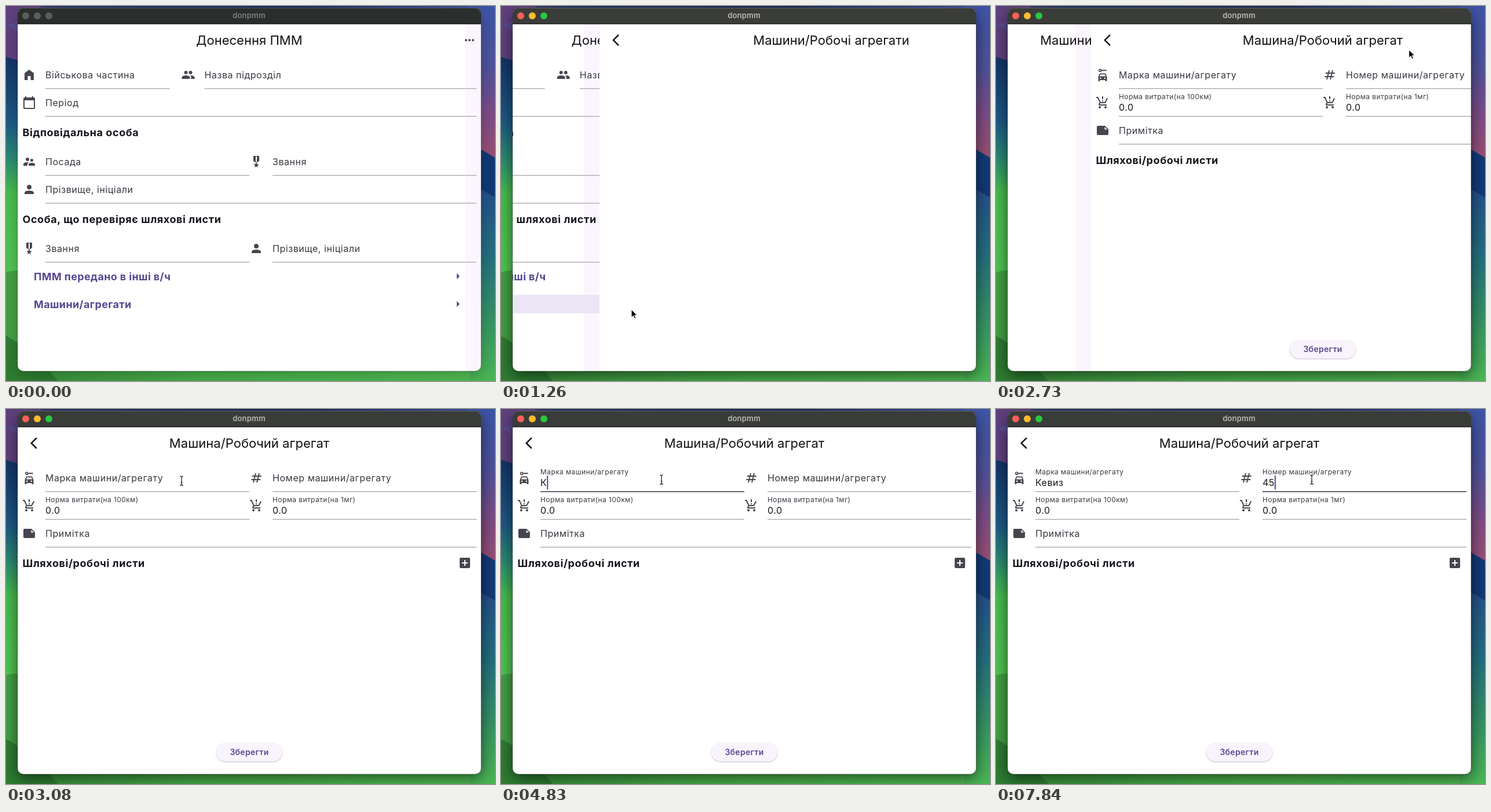
These frames come from a looping animation (844 px wide and 648 px high, 8 s). An HTML page:

```html
<!DOCTYPE html>
<html lang="uk">
<head>
<meta charset="utf-8">
<title>donpmm</title>
<style>
  html, body { margin: 0; width: 100%; height: 100%; overflow: hidden; background: #2f7d32; }
  svg { display: block; width: 100vw; height: 100vh; font-family: Inter, "Open Sans", sans-serif; }
  text { white-space: pre; }
  .title { font-size: 22px; letter-spacing: .04px; fill: #120f14; text-anchor: middle; }
  .label { font-size: 16px; letter-spacing: .54px; fill: #3b3740; }
  .value { font-size: 16px; letter-spacing: .5px; fill: #17141a; }
  .head { font-size: 18px; font-weight: 700; letter-spacing: .58px; fill: #17131b; }
  .head.link { letter-spacing: .38px; fill: #57478f; }
  .icon { fill: #49454f; fill-rule: evenodd; }
  #edge { mix-blend-mode: darken; }
</style>
</head>
<body>
<svg id="stage" viewBox="0 0 844 648" preserveAspectRatio="none">
  <defs>
    <linearGradient id="leftBg" gradientUnits="userSpaceOnUse" x1="0" y1="88" x2="0" y2="648">
      <stop offset="0" stop-color="#123468"/><stop offset=".2" stop-color="#1e5a86"/>
      <stop offset=".31" stop-color="#2b8a74"/><stop offset=".42" stop-color="#48bd4e"/>
      <stop offset=".66" stop-color="#52c552"/><stop offset="1" stop-color="#3fa342"/>
    </linearGradient>
    <linearGradient id="rightTop" gradientUnits="userSpaceOnUse" x1="0" y1="0" x2="0" y2="262">
      <stop offset="0" stop-color="#3d55a6"/><stop offset=".4" stop-color="#4f529c"/>
      <stop offset=".7" stop-color="#7b4d88"/><stop offset="1" stop-color="#9a4f74"/>
    </linearGradient>
    <linearGradient id="rightLow" gradientUnits="userSpaceOnUse" x1="0" y1="318" x2="0" y2="648">
      <stop offset="0" stop-color="#24508a"/><stop offset=".35" stop-color="#24707f"/>
      <stop offset=".65" stop-color="#349067"/><stop offset="1" stop-color="#4bb654"/>
    </linearGradient>
    <linearGradient id="topBg"><stop offset="0" stop-color="#5a3f80"/><stop offset=".12" stop-color="#243667"/>
      <stop offset=".6" stop-color="#1c2c5c"/><stop offset="1" stop-color="#3d55a6"/></linearGradient>
    <linearGradient id="bottomBg"><stop offset="0" stop-color="#398d3b"/><stop offset=".4" stop-color="#48b04a"/>
      <stop offset="1" stop-color="#52c056"/></linearGradient>
    <filter id="blurWide" x="-20%" y="-20%" width="140%" height="140%"><feGaussianBlur stdDeviation="13"/></filter>
    <filter id="blurSoft" x="-20%" y="-50%" width="140%" height="200%"><feGaussianBlur stdDeviation="1.3"/></filter>
    <clipPath id="body"><path d="M20 31H820V621a10 10 0 0 1-10 10H30a10 10 0 0 1-10-10z"/></clipPath>
  </defs>

  <g id="wallpaper">
    <rect width="844" height="648" fill="url(#bottomBg)"/>
    <rect width="844" height="12" fill="url(#topBg)"/>
    <rect width="30" height="620" fill="url(#leftBg)"/>
    <path d="M0 0H60V106L0 88z" fill="#60417f"/>
    <path d="M0 34L40 20V60L0 30z" fill="#5a4f93"/>
    <path d="M0 460Q15 455 30 458V620L0 648z" fill="#43a044"/>
    <path d="M0 570Q40 590 90 648H0z" fill="#2e7d32"/>
    <rect x="800" width="44" height="330" fill="url(#rightTop)"/>
    <path d="M800 306L844 331V648H800z" fill="url(#rightLow)"/>
    <path d="M800 236L844 262V331L800 306z" fill="#123a77"/>
  </g>
  <rect id="shade" x="20" y="14" width="800" height="624" rx="10" filter="url(#blurWide)"/>

  <path id="bar" d="M20 32V13a10 10 0 0 1 10-10H810a10 10 0 0 1 10 10V32z"/>
  <path d="M21 11a9.500 9.500 0 0 1 9-7.500H810a9.500 9.500 0 0 1 9 7.500" fill="none" stroke="#fff" stroke-opacity=".22"/>
  <g id="lights"><circle cx="34" cy="17" r="6"/><circle cx="54" cy="17" r="6"/><circle cx="74" cy="17" r="6"/></g>
  <text id="appName" x="419.500" y="21" text-anchor="middle" font-size="13" font-weight="600" letter-spacing=".2">donpmm</text>
  <g id="pages" clip-path="url(#body)"></g>
  <rect x="20" y="30.200" width="800" height="1.300" fill="#111"/>
  <path d="M20 31V621a10 10 0 0 0 10 10H810a10 10 0 0 0 10-10V31" fill="none" stroke="#000" stroke-opacity=".3"/>

  <g id="arrow"><path d="M0 0V14.500L3.400 11.400 5.600 16.300 8 15.200 5.900 10.500H10.300z" fill="#000" stroke="#fff" stroke-width="1.100"/></g>
  <g id="hand"><path d="M3.500 11L.6 7.700Q-.6 5.900 1 5.700 2.300 5.900 3.500 7.300L2.800 1.600Q2.900.2 4 .2 5 .3 5.200 1.600L5.700 5.200Q7 4.300 7.800 5.500 9.200 4.800 9.900 6.100 11.500 5.600 11.800 7.300 12.200 11 10.600 13.300V16H4.900V14z" fill="#fff" stroke="#111" stroke-width="1.100"/><path d="M6.200 9.500V13M8 9.500V13M9.800 9.500V13" stroke="#111" stroke-width=".9"/></g>
  <g id="beam" fill="none"><path d="M-3-8Q0-8 0-6 0-8 3-8M0-6V6M-3 8Q0 8 0 6 0 8 3 8M-1.500 3H1.500" stroke="#fff" stroke-width="2.600"/><path d="M-3-8Q0-8 0-6 0-8 3-8M0-6V6M-3 8Q0 8 0 6 0 8 3 8M-1.500 3H1.500" stroke="#111" stroke-width="1.200"/></g>
</svg>

<script>
const LOOP = 8000;
const $ = id => document.getElementById(id);

function el(parent, tag, attrs = {}, text) {
  const node = document.createElementNS('http://www.w3.org/2000/svg', tag);
  for (const key in attrs) node.setAttribute(key, attrs[key]);
  if (text !== undefined) node.textContent = text;
  parent.appendChild(node);
  return node;
}
const set = (node, key, value) => node.setAttribute(key, value);
const show = (node, opacity) => set(node, 'opacity', +opacity);

// 24 x 24 icons
const body = (x, y, w, h) => `M${x} ${y}q-${w} 0-${w} ${h}v2h${2 * w}v-2q0-${h}-${w}-${h}z`;
const disc = (x, y, r) => `M${x - r} ${y}a${r} ${r} 0 1 0 ${2 * r} 0a${r} ${r} 0 1 0-${2 * r} 0z`;
const ICONS = {
  home: 'M12 3L4 9v12h5.500v-7h5v7H20V9z',
  group: disc(8, 8, 3) + disc(16, 8, 3) + body(8, 13, 7, 4) + 'M15 13.050Q17 14.300 17 16.500V19h6v-2.500Q22.500 13 15 13.050z',
  calendar: 'M20 3h-1V1h-2v2H7V1H5v2H4q-2 0-2 2v16q0 2 2 2h16q2 0 2-2V5q0-2-2-2zM20 21H4V8h16z',
  staff: disc(9, 8, 3) + disc(16.5, 9.5, 2.5) + body(16.5, 14, 5.5, 3) + 'M9 13Q2 13 2 16.500V19h7v-2.250q0-2.200 2.400-3.500z',
  medal: 'M17 10.400V2H7v8.400q0 .6.500.9l4.200 2.500-1 2.300-3.400.3 2.600 2.200L9.100 22 12 20.200 14.900 22l-.8-3.300 2.600-2.200-3.400-.3-1-2.400 4.200-2.500q.5-.3.500-.9zM13 12.200l-1 .6-1-.6V3h2z',
  person: disc(12, 8, 4) + body(12, 14, 8, 4),
  car: 'M7 9.500h10l2.500 6V22q0 1-1 1h-1q-1 0-1-1v-1h-9v1q0 1-1 1h-1q-1 0-1-1v-6.500zM8 11.200l-1.200 3.300h10.400L16 11.200z'
    + disc(8.2, 17.8, 1.2) + disc(15.8, 17.8, 1.2) + disc(7.8, 4.2, 2.8) + disc(7.8, 4.2, 1.1) + 'M10.700 3.200h8v2h-8z',
  hash: 'M20.500 10l.5-2h-4l1-4h-2l-1 4h-4l1-4h-2L9 8H5l-.5 2h4l-1 4h-4L3 16h4l-1 4h2l1-4h4l-1 4h2l1-4h4l.5-2h-4l1-4zM13.500 14h-4l1-4h4z',
  cart: 'M13 10h-2V8h2zM13 6h-2V1h2z' + disc(7, 20, 2) + disc(17, 20, 2)
    + 'M8.100 13h7.450q1.200 0 1.750-1L21 5l-1.750-1-3.700 7H8.500L4.300 2H1v2h2l3.600 7.600L5.250 14Q4.200 16.600 7 17h12v-2H7z',
  note: 'M4 4h12l6 6v8q0 2-2 2H4q-2 0-2-2V6q0-2 2-2zM15.500 6v4.500H20z',
  add: 'M5 3h14q2 0 2 2v14q0 2-2 2H5q-2 0-2-2V5q0-2 2-2zM17 13v-2h-4V7h-2v4H7v2h4v4h2v-4z',
  right: 'M10 17l5-5-5-5z',
  back: 'M17.800 3.800L16 2 6 12l10 10 1.800-1.800L9.500 12z',
  more: disc(6, 12, 2) + disc(12, 12, 2) + disc(18, 12, 2)
};
const icon = (page, name, cx, cy, attrs = {}) =>
  el(page, 'path', { class: 'icon', d: ICONS[name], transform: `translate(${cx - 12} ${cy - 12})`, ...attrs });

function addPage(title) {
  const page = el($('pages'), 'g');
  el(page, 'rect', { x: 20, y: 31, width: 800, height: 600, fill: '#fff' });
  el(page, 'text', { class: 'title', x: 420, y: 67 }, title);
  return page;
}
const heading = (page, x, y, text, cls = '') => el(page, 'text', { class: 'head ' + cls, x, y }, text);

function addField(page, iconName, x, right, y, text, value = '') {
  icon(page, iconName, x - 28, y);
  const line = el(page, 'line', { x1: x, x2: right, y1: y + 23.8, y2: y + 23.8 });
  const label = el(page, 'text', { class: 'label' }, text);
  const input = el(page, 'text', { class: 'value', x, y: y + 14 }, value);
  const caret = el(page, 'rect', { y: y - 4, width: 2, height: 24, fill: '#55478c', opacity: 0 });
  const field = {
    update(lift, focused, typed, caretOn) {
      set(label, 'transform', `translate(${x} ${y + 6 - 12 * lift}) scale(${1 - lift / 4})`);
      set(line, 'stroke', focused ? '#3d3645' : '#8f8894');
      set(line, 'stroke-width', focused ? 1.6 : 1.1);
      if (input.textContent !== typed) input.textContent = typed;
      set(caret, 'x', x + (typed ? input.getComputedTextLength() : 0));
      show(caret, focused && caretOn);
    }
  };
  field.update(value ? 1 : 0, false, value, false);
  return field;
}

// Report page
const report = addPage('Донесення ПММ');
icon(report, 'more', 800, 59);
addField(report, 'home', 68, 282.5, 119, 'Військова частина');
addField(report, 'group', 342.5, 812, 119, 'Назва підрозділ');
addField(report, 'calendar', 68, 812, 167, 'Період');
heading(report, 28.5, 225, 'Відповідальна особа');
addField(report, 'staff', 68, 420, 269, 'Посада');
addField(report, 'medal', 460, 812, 269, 'Звання');
addField(report, 'person', 68, 812, 317, 'Прізвище, ініціали');
heading(report, 28.5, 375, 'Особа, що перевіряє шляхові листи');
addField(report, 'medal', 68, 420, 419, 'Звання');
addField(report, 'person', 460, 812, 419, 'Прізвище, ініціали');
const row = el(report, 'rect', { x: 28, y: 499, width: 784, height: 32, fill: '#e5dcf2' });
heading(report, 48, 474, 'ПММ передано в інші в/ч', 'link');
heading(report, 48, 522, 'Машини/агрегати', 'link');
for (const y of [467, 515]) icon(report, 'right', 780, y, { style: 'fill:#57478f' });

// Vehicle list
const list = addPage('Машини/Робочі агрегати');
const halo = el(list, 'circle', { cx: 800, cy: 59, r: 20, fill: '#f0eaf2' });
icon(list, 'back', 48, 59, { style: 'fill:#111' });
icon(list, 'add', 800, 59);
const tip = el(list, 'g');
el(tip, 'rect', { x: 615, y: 83, width: 195, height: 25, rx: 4, fill: '#706e70' });
el(tip, 'text', { x: 712.5, y: 100.5, 'text-anchor': 'middle', 'font-size': 12, 'font-weight': 500, 'letter-spacing': .4, fill: '#fff' },
  'Додати нову машину/агрегат');

// Vehicle form
const form = addPage('Машина/Робочий агрегат');
icon(form, 'back', 48, 59, { style: 'fill:#111' });
const brand = addField(form, 'car', 68, 420, 119, 'Марка машини/агрегату');
const plate = addField(form, 'hash', 460, 812, 119, 'Номер машини/агрегату');
addField(form, 'cart', 68, 420, 167, 'Норма витрати(на 100км)', '0.0');
addField(form, 'cart', 460, 812, 167, 'Норма витрати(на 1мг)', '0.0');
addField(form, 'note', 68, 812, 215, 'Примітка');
heading(form, 28.5, 273, 'Шляхові/робочі листи');
icon(form, 'add', 792, 266);
el(form, 'rect', { x: 363, y: 578, width: 114, height: 32, rx: 16, fill: '#8d8496', opacity: .55, filter: 'url(#blurSoft)' });
el(form, 'rect', { x: 363, y: 577, width: 114, height: 32, rx: 16, fill: '#f9f4fc' });
el(form, 'text', { x: 420, y: 598, 'text-anchor': 'middle', 'font-size': 14, 'font-weight': 600, 'letter-spacing': .3, fill: '#57478f' }, 'Зберегти');

// Tint beside the incoming page
const edge = el($('pages'), 'rect', { id: 'edge', y: 31, width: 27, height: 600, fill: '#fbf6fd' });

// Easing
const span = (t, from, to) => Math.min(1, Math.max(0, (t - from) / (to - from)));
function bezier(x1, y1, x2, y2) {
  const at = (a, b, s) => 3 * a * s * (1 - s) ** 2 + 3 * b * s * s * (1 - s) + s ** 3;
  return x => {
    if (x <= 0 || x >= 1) return Math.min(1, Math.max(0, x));
    let lo = 0, hi = 1;
    for (let i = 0; i < 24; i++) {
      const mid = (lo + hi) / 2;
      if (at(x1, x2, mid) < x) lo = mid; else hi = mid;
    }
    return at(y1, y2, lo);
  };
}
const fastIn = bezier(.283, .044, .545, .57);
const slowOut = bezier(.209, 1, .4345, .976);
const enter = x => x < .198 ? .541 * fastIn(x / .198) : .541 + .459 * slowOut((x - .198) / .802);
const leave = bezier(.35, .91, .33, .97);
const standard = bezier(.4, 0, .2, 1);
const easeOut = u => 1 - (1 - u) ** 2;
const easeInOut = u => u * u * (3 - 2 * u);

// Pointer moves: start, end, x, y, easing
const MOVES = [
  [70, 770, 225, 524, easeOut],
  [1330, 2100, 783, 67, easeInOut],
  [2620, 3080, 303, 124, easeInOut],
  [3150, 3430, 277, 122, easeInOut],
  [6370, 6680, 545, 122, easeOut]
];
function pointer(t) {
  let x = 560, y = 660;
  for (const [from, to, nx, ny, ease] of MOVES) {
    const u = ease(span(t, from, to));
    x += (nx - x) * u;
    y += (ny - y) * u;
  }
  return [x, y];
}

// Time table
const ACTIVE = 140, PUSH_LIST = 1093, PUSH_FORM = 2560, PUSH = 500;
const FOCUS_BRAND = 3600, FOCUS_PLATE = 6650, LIFT = 167;
const BRAND = 'Кевиз', BRAND_KEYS = [4830, 5250, 5530, 5740, 5950];
const PLATE = '45', PLATE_KEYS = [7350, 7700];

function typing(t, text, keys, focus) {
  const past = keys.filter(k => k <= t);
  const last = past.length ? past[past.length - 1] : focus;
  return [text.slice(0, past.length), Math.floor((t - last) / 500) % 2 === 0];
}
const shift = (page, x) => set(page, 'transform', `translate(${x} 0)`);

function draw(t) {
  const active = t >= ACTIVE;
  set($('bar'), 'fill', active ? '#3a3c39' : '#2b2e2d');
  set($('appName'), 'fill', active ? '#b9bab8' : '#7d7f7e');
  show($('shade'), active ? .58 : .25);
  ['#fe5f57', '#febc2e', '#28c840'].forEach((color, i) =>
    set($('lights').children[i], 'fill', active ? color : '#5b5e5d'));

  const a = span(t, PUSH_LIST, PUSH_LIST + PUSH);
  const b = span(t, PUSH_FORM, PUSH_FORM + PUSH);
  const listX = 800 * (1 - enter(a)), formX = 800 * (1 - enter(b));
  shift(report, -800 / 3 * leave(a));
  shift(list, b > 0 ? -800 / 3 * leave(b) : listX);
  shift(form, formX);
  show(report, a < 1);
  show(list, a > 0 && b < 1);
  show(form, b > 0);
  set(edge, 'x', (b > 0 ? formX : listX) - 7);

  const [x, y] = pointer(t);
  const onRow = t < PUSH_LIST && y > 499 && y < 531;
  const onAdd = a === 1 && b === 0 && Math.hypot(x - 800, y - 59) < 30;
  const onText = b > .3 && x < 812 && y > 95 && y < 240;
  show(row, t >= 980 ? .75 : onRow ? .35 : 0);
  show(halo, onAdd || (b > 0 && b < .3));
  show(tip, span(t, 2030, 2150) * (1 - span(t, 2520, 2600)));

  brand.update(standard(span(t, FOCUS_BRAND, FOCUS_BRAND + LIFT)), t >= FOCUS_BRAND && t < FOCUS_PLATE,
    ...typing(t, BRAND, BRAND_KEYS, FOCUS_BRAND));
  plate.update(standard(span(t, FOCUS_PLATE, FOCUS_PLATE + LIFT)), t >= FOCUS_PLATE,
    ...typing(t, PLATE, PLATE_KEYS, FOCUS_PLATE));

  const kind = onRow || onAdd ? 'hand' : onText ? 'beam' : 'arrow';
  for (const id of ['arrow', 'hand', 'beam']) show($(id), id === kind);
  set($(kind), 'transform', `translate(${x} ${y})`);
}

const start = performance.now();
function tick() {
  draw((performance.now() - start) % LOOP);
  requestAnimationFrame(tick);
}
draw(0);
requestAnimationFrame(tick);
</script>
</body>
</html>
```
